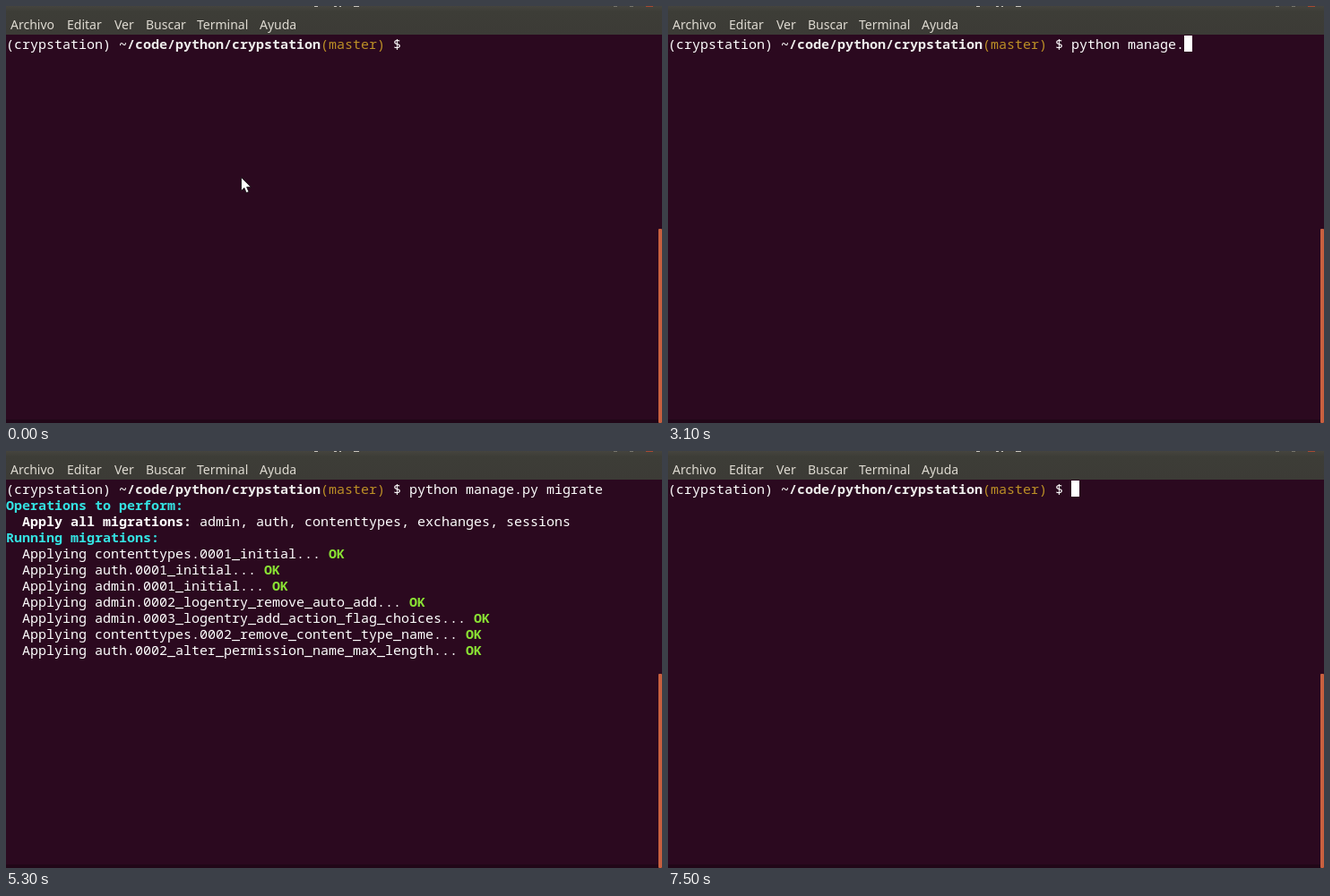
These frames come from a looping animation (732x466 px, 8 s). An HTML page:

```html
<!DOCTYPE html>
<html lang="es">
<head>
<meta charset="utf-8">
<title>Terminal</title>
<style>
html, body { margin: 0; width: 100%; height: 100%; overflow: hidden; background: #2b091f; }
svg { display: block; width: 732px; height: 466px; }
text { white-space: pre; }
.menu { font: 14px "Noto Sans", "Open Sans", sans-serif; fill: #dfdbd2; }
.term { font: 15px "Noto Sans Mono", "DejaVu Sans Mono", monospace; fill: #fff; }
.bold { font-weight: bold; }
</style>
</head>
<body>
<svg viewBox="0 0 732 466">
  <defs>
    <linearGradient id="bar" x2="0" y2="1">
      <stop offset="0" stop-color="#45443e"/>
      <stop offset="0.2" stop-color="#3d3d37"/>
      <stop offset="1" stop-color="#3c3b36"/>
    </linearGradient>
  </defs>
  <rect width="732" height="466" fill="#2b091f"/>
  <rect y="462" width="732" height="4" fill="#210718"/>
  <rect width="732" height="32" fill="url(#bar)"/>
  <path d="M344 .5h4M366 .5h3M372 .5h2M388 .5h6" stroke="#c9c5bc"/>
  <path d="M678 .5h4M696 .5h4" stroke="#77756c"/>
  <path d="M714 .5h8" stroke="#a64a32"/>
  <rect x="728" y="249" width="4" height="217" rx="1" fill="#c8603f"/>
  <g id="menu" class="menu"></g>
  <g id="screen" class="term"></g>
  <rect id="caret" width="9" height="18" fill="#fff"/>
  <path id="mouse" d="M262.5 191.5v15l3.4-3.2 2.3 5.4 2.7-1.1-2.3-5.3h4.6z" fill="#fff" stroke="#111" stroke-width=".8"/>
</svg>
<script>
const LOOP = 8000, COL = 9, ROW = 18, TOP = 33, PROMPT = 50;
const WHITE = '#fff', CYAN = '#34e2e2', GREEN = '#8ae234', GOLD = '#bd9026';
const byId = id => document.getElementById(id);
const menu = byId('menu'), screen = byId('screen'), caret = byId('caret'), mouse = byId('mouse');

function addText(parent, x, y, str, fill, bold) {
  const el = document.createElementNS('http://www.w3.org/2000/svg', 'text');
  el.setAttribute('x', x);
  el.setAttribute('y', y);
  if (fill) el.setAttribute('fill', fill), el.style.fill = fill;
  if (bold) el.setAttribute('class', 'bold');
  el.textContent = str;
  parent.append(el);
}

const put = (row, col, str, fill = WHITE, bold = false) =>
  addText(screen, col * COL, TOP + 15 + row * ROW, str, fill, bold);

[['Archivo', 5], ['Editar', 68], ['Ver', 121], ['Buscar', 156], ['Terminal', 213], ['Ayuda', 283]]
  .forEach(([label, x]) => addText(menu, x, 26, label));

const migrations = `contenttypes.0001_initial
auth.0001_initial
admin.0001_initial
admin.0002_logentry_remove_auto_add
admin.0003_logentry_add_action_flag_choices
contenttypes.0002_remove_content_type_name
auth.0002_alter_permission_name_max_length
auth.0003_alter_user_email_max_length
auth.0004_alter_user_username_opts
auth.0005_alter_user_last_login_null
auth.0006_require_contenttypes_0002
auth.0007_alter_validators_add_error_messages
auth.0008_alter_user_username_max_length
auth.0009_alter_user_last_name_max_length
exchanges.0001_initial
exchanges.0002_auto_20190223_0129
sessions.0001_initial`.split('\n');

// Each entry: time in ms, text typed so far
const command = [
  [0, ''], [400, 'p'], [500, 'py'], [600, 'pyt'], [800, 'pyth'], [900, 'pytho'], [1000, 'python'],
  [1200, 'python m'], [1400, 'python man'], [1800, 'python mang'], [2000, 'python manga'],
  [2400, 'python man'], [2500, 'python mana'], [2700, 'python manage'], [3100, 'python manage.'],
  [3300, 'python manage.p'], [3500, 'python manage.py']
];
[...'migrate'].forEach((_, i) =>
  command.push([3800 + i * 100, 'python manage.py ' + 'migrate'.slice(0, i + 1)]));
const clearing = [[6000, ''], [6900, 'c'], [7000, 'cle'], [7100, 'clear']];
const output = [[0, 0], [5100, 4], [5200, 7], [5300, 10], [5400, 14], [5500, 17], [5700, 20]];

const at = (steps, t) => steps.reduce((value, [time, next]) => t >= time ? next : value, steps[0][1]);

function prompt(row, typed) {
  put(row, 0, '(crypstation)');
  put(row, 14, '~/code/python/crypstation', '#eeeeec', true);
  put(row, 39, '(master)', GOLD);
  put(row, 48, '$');
  if (typed) put(row, PROMPT, typed);
}

function outputRow(row) {
  if (row === 1) put(row, 0, 'Operations to perform:', CYAN, true);
  else if (row === 2) {
    put(row, 2, 'Apply all migrations:', WHITE, true);
    put(row, 24, 'admin, auth, contenttypes, exchanges, sessions');
  } else if (row === 3) put(row, 0, 'Running migrations:', CYAN, true);
  else {
    const line = `Applying ${migrations[row - 4]}...`;
    put(row, 2, line);
    put(row, line.length + 3, 'OK', GREEN, true);
  }
}

function caretCell(t, typed) {
  if (t < 400) return null;
  if (t < 5000) return [PROMPT + typed.length, 0];
  if (t < 5100) return [0, 1];
  if (t < 5700) return null;
  if (t < 6000) return [0, 21];
  if (t >= 6300 && t < 6900) return null;
  return t < 7500 ? [PROMPT + at(clearing, t).length, 21] : [PROMPT, 0];
}

function draw(t) {
  const typed = t < 7500 ? at(command, t) : '';
  screen.replaceChildren();
  prompt(0, typed);
  if (t < 7500) {
    for (let row = 1; row <= at(output, t); row++) outputRow(row);
    if (t >= 6000) prompt(21, at(clearing, t));
  }
  const cell = caretCell(t, typed);
  caret.style.display = cell ? '' : 'none';
  if (cell) {
    caret.setAttribute('x', cell[0] * COL);
    caret.setAttribute('y', TOP + cell[1] * ROW);
  }
  mouse.style.display = t < 400 ? '' : 'none';
}

// All changes fall on 100 ms ticks, so redraw only when the tick changes
let start, shown = -1;
function frame(now) {
  start ??= now;
  const tick = Math.floor((now - start) % LOOP / 100);
  if (tick !== shown) draw((shown = tick) * 100);
  requestAnimationFrame(frame);
}
draw(0);
requestAnimationFrame(frame);
</script>
</body>
</html>
```
